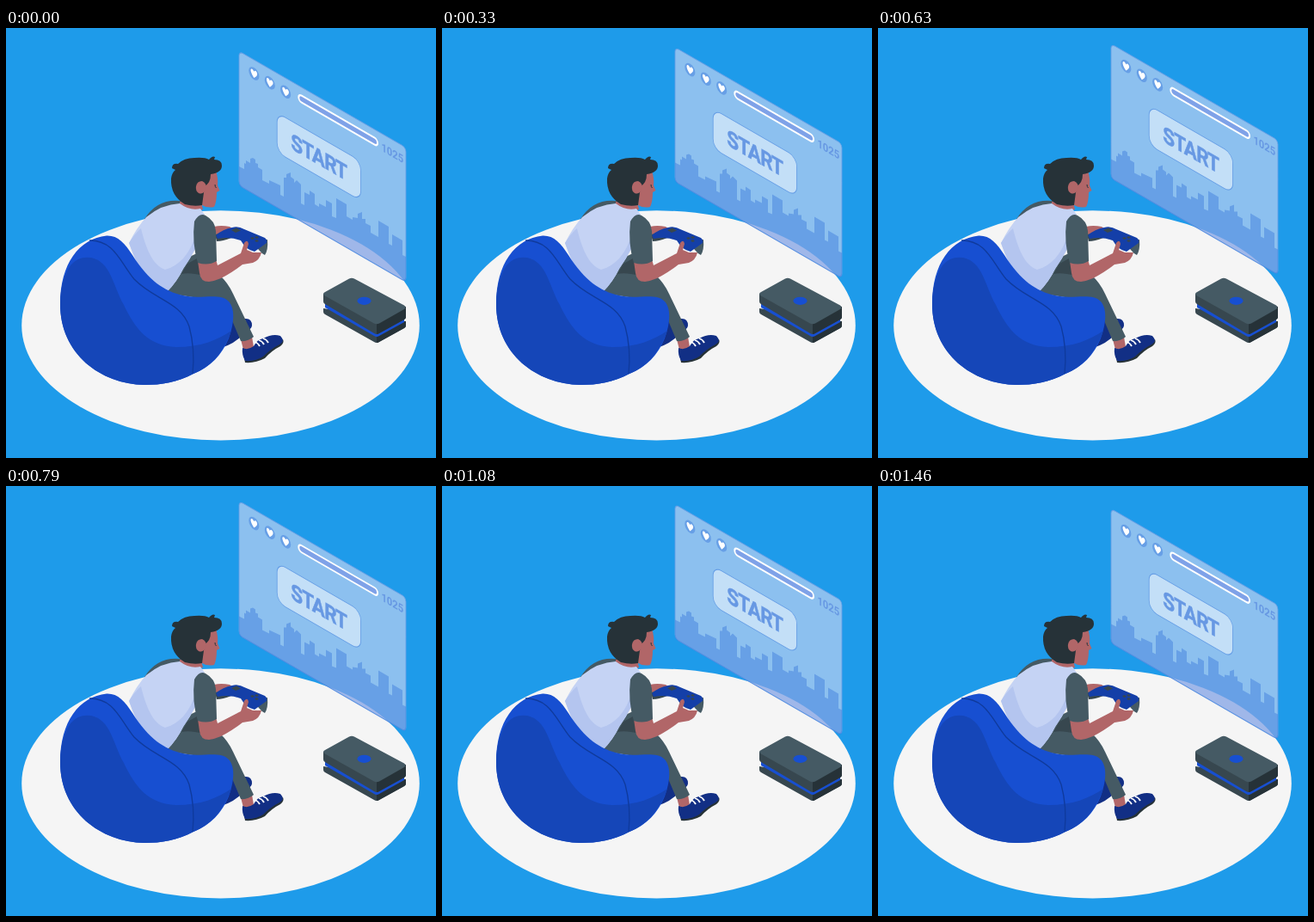
Write an HTML page that moves like this. It is 500 px wide and 500 px high and loops after 1.5 s.

```html
<!DOCTYPE html>
<html lang="en">
<head>
<meta charset="utf-8">
<title>Player and floating screen</title>
<style>
  html, body { margin: 0; height: 100%; overflow: hidden; background: #1e9bea; }
  svg { display: block; width: 100%; height: 100%; }
  text { font-family: Roboto, sans-serif; font-weight: 700; fill: #6798e3; }
  .skin { fill: #b16668; }
  .hair { fill: #263238; }
  .cloth { fill: #455a64; }
  .shade { fill: #37474f; }
  .blue { fill: #174fd1; }
  .deep { fill: #1546b8; }
  .navy { fill: #122f85; }
</style>
</head>
<body>
<svg viewBox="0 0 500 500">
  <defs>
    <g id="life">
      <circle r="7" fill="#679fe6"/>
      <path d="M0 5C-3 2-4.6 0-4.4-2C-4-4.8-1-4.8 0-2.2C1-4.8 4-4.8 4.4-2C4.6 0 3 2 0 5Z" fill="#fff"/>
    </g>
  </defs>

  <ellipse cx="249.500" cy="345.800" rx="231.300" ry="133.600" fill="#f5f5f5"/>

  <g id="screen">
    <g transform="matrix(.866 .5 0 1 271 27)">
      <rect width="224" height="156" rx="5" fill="#fae5f5" fill-opacity=".5" stroke="#679fe6"/>
    </g>
    <path fill="#3f7bdb" fill-opacity=".48" d="M271 161L277 164V157L279 158V154L284 157V152L287 151L290 153V157L293 158V162L298 165V177L306 181V177L319 183V194L323 196V174L326 174V170L331 168V173L335 176V180L338 177L343 182V204L347 206V191L353 194V189L359 193V205L364 208V204L372 208V213V200L379 204V219L384 221V198L396 205V219L403 223V220L409 221V216L414 214V222L418 222V227L424 230V238L433 243V224L445 231V251L449 253V240L461 247V264L465 266V291Q465 296 460 293L275 186Q271 184 271 180Z"/>
    <g transform="matrix(.866 .5 0 1 271 27)">
      <use href="#life" x="20" y="16"/>
      <use href="#life" x="41.300" y="16"/>
      <use href="#life" x="62.500" y="16"/>
      <rect x="80" y="9.700" width="106" height="8" rx="4" fill="#7fa2e8" stroke="#fff" stroke-width="2.200"/>
      <text x="191" y="20" font-size="13">1025</text>
      <rect x="51" y="46" width="112.500" height="46" rx="11" fill="#fff" fill-opacity=".48" stroke="#679fe6"/>
      <text x="107" y="78.500" font-size="26" letter-spacing="-1" text-anchor="middle" stroke="#6798e3" stroke-width=".5">START</text>
    </g>
  </g>

  <g id="console">
    <path class="shade" d="M369 326V330Q369 332 371 333L428 365Q431 367 434 365L463 349Q465 348 465 346V341Z"/>
    <path class="hair" d="M431 358V366Q433 366 434 365L463 349Q465 348 465 346V341Z"/>
    <path class="blue" d="M371 319V325L428 358Q431 360 434 358L463 342V335L431 352Z"/>
    <path class="shade" d="M369 309V318Q369 320 371 321L428 355Q431 357 434 355L463 339Q465 338 465 336V324Z"/>
    <path class="hair" d="M431 344V356Q433 356 434 355L463 339Q465 338 465 336V324Z"/>
    <path class="cloth" d="M371 307L399 291.500Q402 290 405 291.500L463 322.500Q466 325 463 327L434 343.500Q431 345 428 343.500L371 311.500Q367 309 371 307Z"/>
    <ellipse class="blue" cx="416.500" cy="317.300" rx="8" ry="4.600"/>
  </g>

  <g id="legs">
    <path class="navy" d="M250 372L262 338L279 338Q286 338 286 346Q286 350 276 356Q266 367 250 372Z"/>
    <path class="skin" d="M273 362L286 359L288 371Q283 377 276 374Z"/>
    <path class="hair" d="M276 378L278 389Q290 390 301 384Q309 375 319 370Q324 366 322 362Z"/>
    <path class="navy" d="M275 372Q281 375 288 370Q292 362 299 361Q310 355 319 358Q325 364 318 368Q308 373 299 382Q290 388 278 387Q274 380 275 372Z"/>
    <path d="M289 365Q293 366 295 370M294 363Q298 364 300 368M299 361Q303 362 305 366" fill="none" stroke="#fff" stroke-width="1.800"/>
    <path class="cloth" d="M185 308L205 270L222 262L232 286L248 287Q258 296 264 309L288 359Q281 365 273 364L262 338L250 318Z"/>
    <path class="shade" d="M204 286L211 274L222 268L229 288Q214 284 204 286Z"/>
  </g>

  <g id="body">
    <path class="cloth" d="M161 222Q176 198 203 201L206 208L172 224Z"/>
    <path class="skin" d="M202 202L226 198L229 211Q214 216 202 208Z"/>
    <path d="M202 204Q214 213 226 210L231 217L219 230L221 255Q214 269 206 280Q199 295 187 307Q160 300 143 250Q152 232 163 220Q181 205 202 204Z" fill="#c5d3f4"/>
    <path d="M143 250Q149 240 157 233C162 254 170 276 185 281Q210 274 220 242L221 255Q214 269 206 280Q199 295 187 307Q160 300 143 250Z" fill="#b4c5ef"/>
  </g>

  <g id="bag">
    <path class="blue" d="M117 241.500C130 241 138 250 147 264C166 294 184 306 206 311C226 316 249 307 259 318C267 327 265 345 259 361C251 380 238 394 218 402C199 412 181 415 161 415C110 414 63 379 63 321C63 274 85 245 117 241.500Z"/>
    <path class="deep" d="M75 276Q84 265 99 267C122 272 124 299 137 322C150 350 166 370 198 371C226 371 246 363 262 352C252 379 238 394 218 402C199 412 181 415 161 415C110 414 63 379 63 321Q63 294 75 276Z"/>
    <path d="M97 247C126 247 132 271 149 292C172 316 203 318 213 347Q220 373 217 402" fill="none" stroke="#0f3a9c" stroke-width="1.300"/>
  </g>

  <g id="head">
    <path class="skin" d="M224 172L237 169L244 166Q247 175 246 183L248.500 189L245 191Q245 202 242 208Q234 210 226 205L220 190Z"/>
    <path class="hair" d="M193 163Q193 157 200 158Q207 151 219 151Q231 150 236 153Q240 148 243 150L242 153Q251 153 251 160Q251 168 238 170Q238 180 231 184L228 206Q219 208 208 205Q191 195 192 175Q193 168 197 165Z"/>
    <path class="skin" d="M221 184Q222 178 228 178Q234 180 232 188Q229 194 224 192Q220 189 221 184Z"/>
    <path d="M243 182Q243 185 244.500 186" fill="none" stroke="#263238" stroke-width="1"/>
  </g>

  <g id="hands">
    <path class="skin" d="M242 231Q250 229 260 231L266 235L258 238L243 240Z"/>
    <path class="shade" d="M243 240L258 236L262 244Q252 248 245 248Z"/>
    <path class="cloth" d="M287 250L304 246Q305 258 301 264Q297 262 294 258Z"/>
    <path fill="#143fa8" d="M244 241Q252 234 263 232Q270 230 277 234L301 244Q304 246 303 250L289 260Q279 258 273 247Q260 242 246 245Z"/>
    <path class="shade" d="M262 235L268 232.500L273 235.500L267 238ZM284 244L287 243L289 245L286 246ZM289 243L292 242L294 244L291 245ZM289 247L292 246L294 248L291 249Z"/>
    <path class="skin" d="M223 271L244 269L246 276L273 262L277 250Q281 245 282 251L280 258L287 261L297 261Q295 270 287 273L275 275Q262 285 250 291Q243 294 236 295Q226 295 225 285Z"/>
    <path class="cloth" d="M219 225Q225 214 232 218Q243 224 244 236L245 271Q235 277 223 273Q216 250 219 225Z"/>
  </g>
</svg>
<script>
  const screenGroup = document.getElementById('screen');
  const LOOP = 1500, RISE = 10;

  // Linear rise and fall
  function draw(now) {
    const phase = (now % LOOP) / LOOP;
    const lift = RISE * (1 - Math.abs(1 - 2 * phase));
    screenGroup.setAttribute('transform', `translate(0 ${-lift})`);
    requestAnimationFrame(draw);
  }
  draw(0);
</script>
</body>
</html>
```
